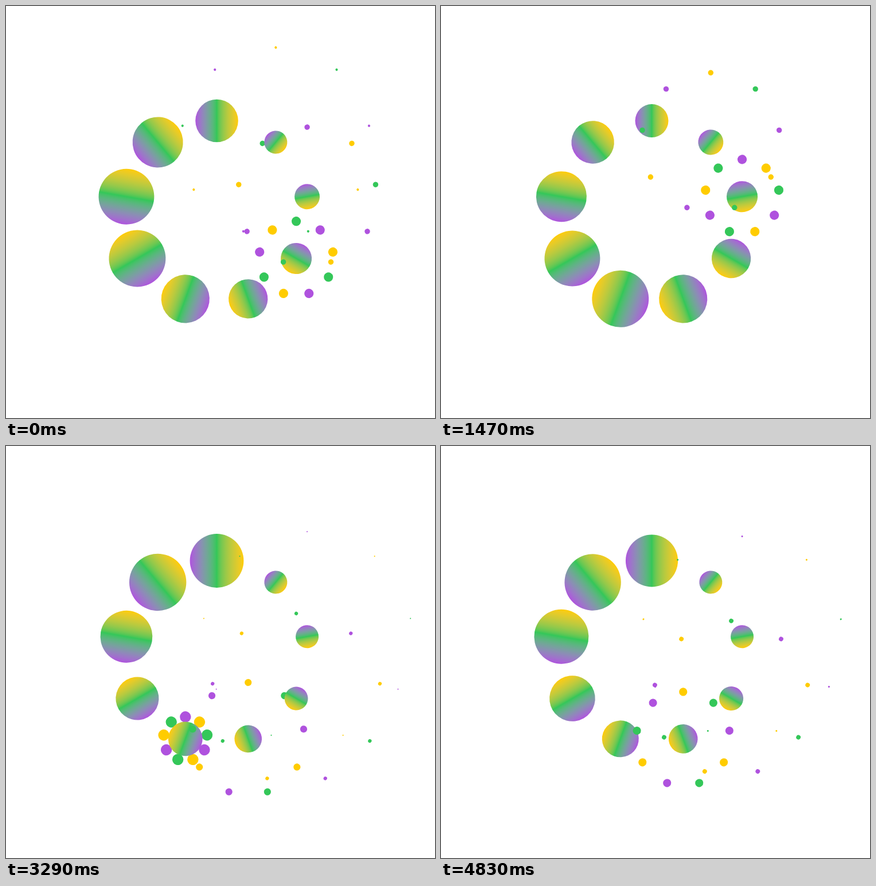
Animation, 748 px wide and 718 px high, one loop 4900 ms. Source, as an HTML page with a canvas:

```html
<!DOCTYPE html>
<html lang="en">
<head>
<meta charset="utf-8">
<title>Bursting ring loader</title>
<style>
  html, body { margin: 0; width: 100%; height: 100%; overflow: hidden; background: #fff; }
  canvas { display: block; }
</style>
</head>
<body>
<canvas id="stage" width="748" height="718"></canvas>
<script>
const ctx = document.getElementById('stage').getContext('2d');
const LOOP = 4900, STEP = 70, BEAT = 98; // ms
const PERIOD = 16;                       // beats between two swells of one ball
const COUNT = 9, TURN = Math.PI * 2 / COUNT;
const PURPLE = [175, 82, 222], GREEN = [52, 199, 89], YELLOW = [255, 204, 0];

const rgb = color => `rgb(${color.map(Math.round)})`;
const SPARKS = [GREEN, PURPLE, YELLOW].map(rgb);

// Mixing squared channels keeps blends as bright as light itself
const mix = (a, b, x) => a.map((v, i) => Math.sqrt(v * v * (1 - x) + b[i] * b[i] * x));

const BLEND = Array.from({ length: 33 }, (_, i) => {
  const x = i / 16;
  return rgb(x < 1 ? mix(PURPLE, GREEN, x) : mix(GREEN, YELLOW, x - 1));
});

// Sine ease-out, softened at the start as weight drops below 1
function ease(x, weight = 1) {
  x = Math.max(0, Math.min(1, x));
  return weight * Math.sin(x * Math.PI / 2) + (1 - weight) * x * x * (3 - 2 * x);
}

function disc(x, y, r, fill) {
  ctx.fillStyle = fill;
  ctx.beginPath();
  ctx.arc(x, y, r, 0, Math.PI * 2);
  ctx.fill();
}

function drawBurst(beat) {
  const spread = ease((beat - 11.97) / 4.9);
  if (!spread) return;
  for (let k = 0; k < COUNT; k++) {
    const a = k * TURN, d = 200 * spread;
    disc(d * Math.sin(a), -d * Math.cos(a), 12 * (1 - spread), SPARKS[k % 3]);
  }
}

function drawBall(beat) {
  const swell = ease((beat - 5) / 5, 0.95) - ease((beat - 9.92) / 5.1, 0.7);
  const r = 20 + 30 * swell;
  const fill = ctx.createLinearGradient(-r, 0, r, 0);
  BLEND.forEach((color, i) => fill.addColorStop(i / 32, color));
  disc(0, 0, r, fill);
}

function draw(ms) {
  const time = Math.floor(ms / STEP + 0.05) * STEP % LOOP;
  ctx.clearRect(0, 0, 748, 718);
  for (let i = COUNT; i > 0; i--) {
    const beat = (time / BEAT - i + PERIOD) % PERIOD;
    ctx.save();
    ctx.translate(367.5, 360);
    ctx.rotate(i * TURN);
    ctx.translate(0, -160);
    drawBurst(beat);
    drawBall(beat);
    ctx.restore();
  }
}

function tick() {
  draw(performance.now());
  requestAnimationFrame(tick);
}
tick();
</script>
</body>
</html>
```
